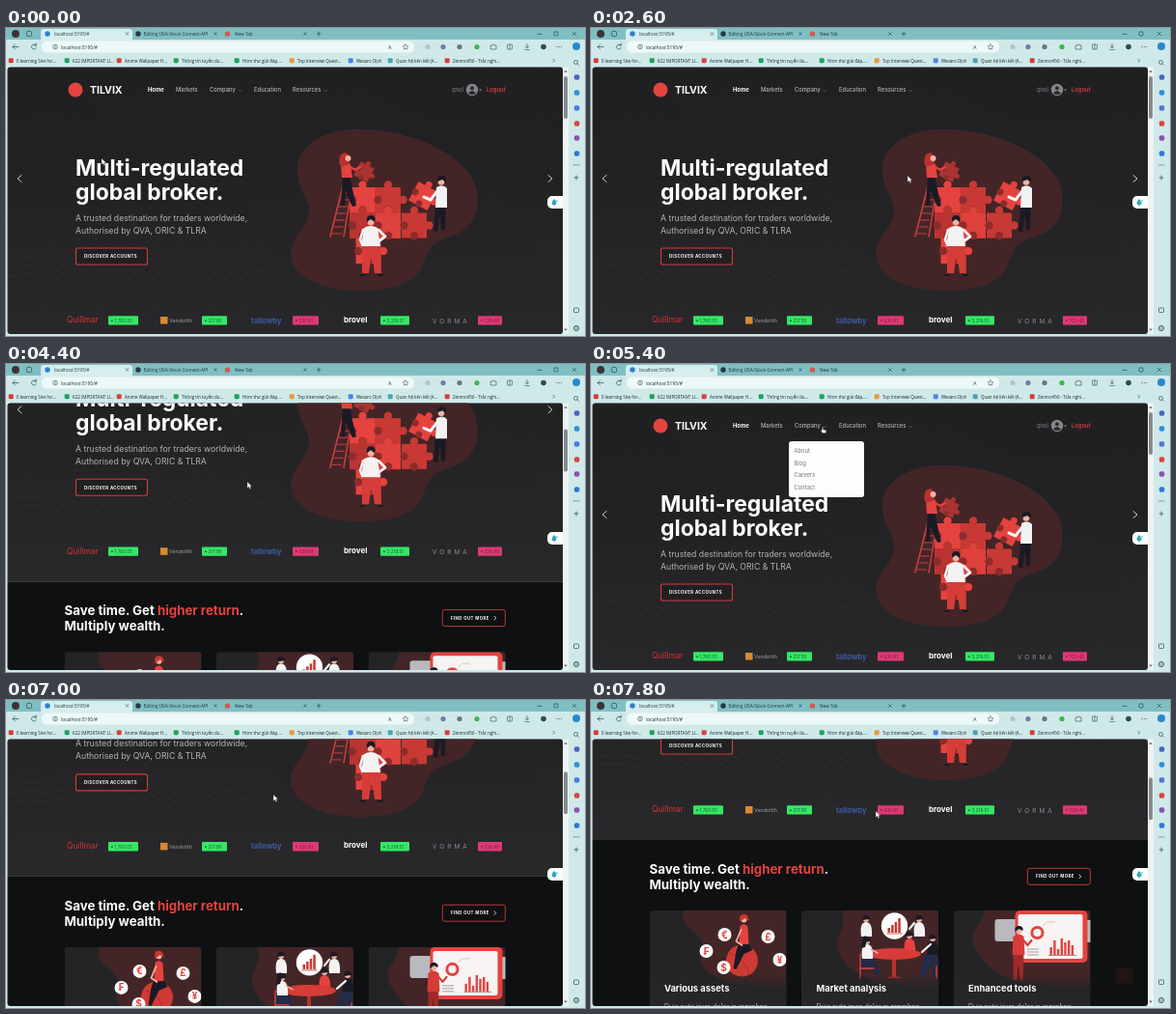
Write an HTML page that moves like this. It is 600 by 319 pixels and loops after 8 s.

```html
<!DOCTYPE html>
<html lang="en">
<head>
<meta charset="utf-8">
<title>Broker site in a browser</title>
<style>
  html, body { margin: 0; width: 100%; height: 100%; overflow: hidden; background: #cfe9e9; }
  svg { display: block; width: 100vw; height: 100vh; }
  text { font-family: Inter, "Noto Sans", sans-serif; white-space: pre; }
  .ui text { font-family: "Open Sans", "Noto Sans", sans-serif; }
</style>
</head>
<body>
<svg id="stage" viewBox="0 0 600 319"></svg>
<script>
const RED = '#e5433f', INK = '#1a1a24', SKIN = '#f3b3a4', BLOB = '#432527', WHITE = '#f4f2f3', NAVY = '#242a48';

// Shape helpers
const rect = (x, y, w, h, fill, rx = 0, more = '') =>
  `<rect x="${x}" y="${y}" width="${w}" height="${h}" rx="${rx}" fill="${fill}" ${more}/>`;
const dot = (x, y, r, fill, more = '') => `<circle cx="${x}" cy="${y}" r="${r}" fill="${fill}" ${more}/>`;
const shape = (d, fill, more = '') => `<path d="${d}" fill="${fill}" ${more}/>`;
const line = (d, stroke, width = 1) =>
  `<path d="${d}" fill="none" stroke="${stroke}" stroke-width="${width}" stroke-linecap="round" stroke-linejoin="round"/>`;
const text = (x, y, size, str, fill, more = '') =>
  `<text x="${x}" y="${y}" font-size="${size}" fill="${fill}" ${more}>${str}</text>`;
const bold = 'font-weight="700"';
const group = (more, ...parts) => `<g ${more}>${parts.join('')}</g>`;
const range = n => [...Array(n).keys()];
const cross = (x, y, r, color) =>
  line(`M${x - r} ${y - r}l${2 * r} ${2 * r}m0 ${-2 * r}l${-2 * r} ${2 * r}`, color, .6);
const plus = (x, y, r, color) => line(`M${x - r} ${y}h${2 * r}M${x} ${y - r}v${2 * r}`, color, .7);

// Browser window around the page
function browser() {
  const ink = '#2c4a50';
  const bookmarks = [
    [5, '#d63b3b', 'E-learning Site for...'], [63, '#1fa35c', 'K22 IMPORTANT LI...'],
    [117, '#d8433c', 'Anime Wallpaper H...'], [176, '#1fa35c', 'Thông tin tuyển du...'],
    [239, '#1fa35c', 'Hòm thư giải đáp,...'], [296, '#e79a2e', 'Top Interview Quest...'],
    [357, '#4a83e8', 'Wexaro Dịch'], [398, '#45a6b8', 'Quan hệ liên kết (A...'],
    [457, '#d63b3b', 'Zenmo456 - Trắc nghi...']
  ];
  const tools = [[437, '#b4c4c6'], [453, '#6a7fa8'], [470, '#6b7780'], [488, '#3fb24f']];
  const side = [[51, '#4a64c8'], [67, '#2e8fd8'], [83, '#4d78d9'],
    [99, '#d7473d'], [114, '#8b4fb3'], [130, '#2b7bd4']];
  return group('class="ui"',
    rect(0, 0, 600, 319, '#cfe9e9'),
    rect(0, 0, 600, 12, '#7fbfc3'),
    rect(36, 1, 95, 13, '#d5eeee', 3),
    dot(10, 6, 4, '#3c3236'),
    rect(21.5, 3.5, 5, 5, 'none', 1, `stroke="${ink}" stroke-width=".7"`),
    dot(43, 6, 2.7, '#2f7fd0'), text(50, 8, 4.7, 'localhost:5195/#', '#213539'), cross(125.5, 6, 1.4, ink),
    dot(137, 6, 2.7, '#24383e'), text(142.5, 8, 4.7, 'Editing USA-Stock-Connect-API', '#213539'), cross(217, 6, 1.4, ink),
    dot(229.5, 6, 2.7, '#d6594f'), text(237, 8, 4.7, 'New Tab', '#213539'), cross(310, 6, 1.4, ink),
    plus(324, 6, 2, ink),
    line('M551 6.3h4', ink, .7), rect(568, 4, 4, 4, 'none', .6, `stroke="${ink}" stroke-width=".7"`), cross(589, 6, 1.9, ink),
    rect(37, 13.5, 386, 12, '#eef8f8', 5),
    line('M13 19.5h-6m2.5-2.5l-2.5 2.5 2.5 2.5M31 18a2.5 2.5 0 1 0 .2 2.6M31.3 16v2h-2', ink, .7),
    dot(51, 19.5, 2.3, 'none', `stroke="${ink}" stroke-width=".6"`), line('M51 19.3v1.3M51 18.2v.1', ink, .6),
    text(57, 21.7, 4.9, 'localhost:5195/#', '#1c2c30'),
    text(396, 21.7, 5.5, 'A', ink),
    line('M414 16.7l.9 1.9 2 .2-1.5 1.4.4 2-1.8-1-1.8 1 .4-2-1.5-1.4 2-.2z', ink, .5),
    tools.map(([x, c]) => dot(x, 19.5, 2.6, c)).join(''),
    rect(519.5, 17, 5, 5, 'none', .7, `stroke="${ink}" stroke-width=".6"`), line('M522 17v5', ink, .6),
    line('M502.5 18h2a1 1 0 0 1 2 0h1.5v4h-5.5zM540 16.5v4m-1.8-1.6l1.8 1.7 1.8-1.7M537.6 22.5h4.8', ink, .6),
    dot(557, 19.5, 2.8, ink),
    [571, 573.3, 575.6].map(x => dot(x, 19.5, .55, ink)).join(''),
    bookmarks.map(([x, c, label]) => rect(x - 2.3, 31.3, 5, 5, c, 1.2) + text(x + 6, 35.7, 4.5, label, '#16282c')).join(''),
    line('M567 32.3l1.6 1.6-1.6 1.6', ink, .7),
    dot(591, 19, 4, '#2b86d0'),
    side.map(([y, c]) => rect(588.8, y - 2.7, 5.5, 5.5, c, 2)).join(''),
    dot(590.5, 35.5, 2, 'none', `stroke="${ink}" stroke-width=".7"`), line('M592 37l1.7 1.7M588 142h6', ink, .5),
    plus(591, 155, 2, ink),
    rect(588.5, 290, 5, 4.5, 'none', .8, `stroke="${ink}" stroke-width=".7"`),
    dot(591, 311, 2.5, 'none', `stroke="${ink}" stroke-width="1"`), dot(591, 311, .7, ink));
}

// Jigsaw piece of side s, with knobs on its right and top edges
function piece(x, y, s, fill, turn = 0) {
  const k = s * .16;
  return group(`transform="translate(${x} ${y}) rotate(${turn})"`,
    rect(-s / 2, -s / 2, s, s, fill), dot(s / 2 + k * .6, 0, k, fill), dot(0, -s / 2 - k * .6, k, fill),
    dot(-s / 2 + k * .6, 0, k, '#8d2c2b'), dot(0, s / 2 - k * .6, k, '#8d2c2b'));
}

function heroArt() {
  const rungs = range(7).map(i => line(`M${348 - i * 1.6} ${171 + i * 7}h9`, '#c9413d', 1)).join('');
  return [
    shape('M302 150C300 122 328 106 362 105C420 104 478 132 487 165C494 196 478 212 455 218C428 226 440 250 417 262C402 270 385 272 368 272C335 272 302 262 296 240C292 218 312 210 314 191C314 175 303 168 302 150Z', BLOB),
    line('M349 164l-13 52M358 168l-8 48', '#c9413d', 1.5), rungs,
    rect(356, 165, 53, 53, '#b93431'),
    piece(369.5, 178, 26, RED), piece(396, 178, 26, '#c83935'),
    piece(369.5, 204.5, 26, '#ba3431'), piece(396, 204.5, 26, '#df413d'),
    piece(423, 204.5, 26, '#c83935'), piece(375.5, 231, 26, RED),
    piece(371, 149, 16, '#a93431', 28), piece(432, 174, 22, RED, 28),
    // climber
    shape('M349 153l7 0 3 14 4 17-4 1-7-16-1 15-4 0z', INK),
    shape('M347 141q6-5 10 0l2 14h-11z', RED), line('M355 143l7 4 5-3', RED, 2.2),
    shape('M347 131q6-4 8 1l1 9-8 3q-5-4-1-13z', '#b8332f'), dot(354.5, 135, 3, SKIN),
    // right-hand helper
    shape('M445 184h11l-1 25-4 0-1-16-3 18-4-1z', INK), shape('M446 165q7-4 11 1l0 20h-12z', WHITE),
    line('M447 169l-7 9-7-3', WHITE, 3), dot(451, 159.5, 3.3, SKIN), shape('M447 159q-1-7 6-6 4 1 3 7l-4-3z', INK),
    // front helper
    shape('M369 225h19l1 29h-7l-3-22-3 22h-7z', '#d63c38'), line('M371 256h-4M386 256h4', INK, 2.2),
    shape('M371 207q7-4 14 0l3 19h-20z', WHITE),
    line('M386 209l7 7-7 5', WHITE, 2.8), line('M370 209l-3 10 2 5', WHITE, 2.6),
    dot(378, 201, 3.4, SKIN), shape('M374 201q-1-8 5-7 5 1 3 7l-4-3z', INK)
  ].join('');
}

function ticker() {
  const badges = [[106, 31, 1, '1,760.05'], [203, 26, 1, '217.90'], [297, 27, 0, '330.81'], [388, 30, 1, '3,218.51'], [489, 25, 0, '729.40']];
  return [
    text(63, 305.3, 8.4, 'Quillmar', '#d8302f'),
    rect(160, 299, 7.5, 7.5, '#d98a32'), text(169, 305, 5.4, 'Vendolith', '#a0a0a4'),
    text(254, 305.5, 7.6, 'tallowby', '#3d5a9f', bold),
    text(350, 304.5, 8, 'brovel', '#fff', bold),
    text(442, 305.5, 6.5, 'VORMA', '#8b8b90', 'letter-spacing="3"'),
    badges.map(([x, w, up, value]) =>
      rect(x, 298.2, w, 9.4, up ? '#35e765' : '#dd3a73', 1) +
      shape(up ? `M${x + 2.6} 303.8l1.3-2 1.3 2z` : `M${x + 2.6} 302l1.3 2 1.3-2z`, up ? '#14612f' : '#8b1843') +
      text(x + 6.5, 304.7, 4.7, value, up ? '#14612f' : '#8b1843')).join('')
  ].join('');
}

function waves() {
  const left = range(26).map(i => `M0 ${52 + i * 9}C70 ${30 + i * 9} 90 ${120 + i * 8} ${290 - i * 3} ${205 + i * 7}`).join('');
  const right = range(20).map(i => `M${350 + i * 11} 40C${410 + i * 10} 100 ${480 + i * 6} 70 577 ${280 - i * 11}`).join('');
  return group('opacity=".26"', line(left, 'url(#wave)', .9)) + group('opacity=".22"', line(right, 'url(#wave)', .9));
}

function hero() {
  const nav = [[176, 'Markets'], [211, 'Company'], [257, 'Education'], [297, 'Resources']];
  return [
    rect(0, 38, 578, 296, 'url(#heroShade)'), waves(),
    dot(72, 64, 7.5, RED), text(87, 67.6, 10.5, 'TILVIX', '#fff', bold),
    text(147, 66.3, 5.8, 'Home', '#fff', bold),
    nav.map(([x, label]) => text(x, 66.3, 5.85, label, '#b4b4b8', 'font-weight="500"')).join(''),
    line('M241 64.3l1.4 1.4 1.4-1.4M330 64.3l1.4 1.4 1.4-1.4', '#77777c', .6),
    text(462, 66.3, 5.9, 'qnol', '#85858a'), dot(483, 64, 6.2, '#85858a'),
    dot(483, 62.2, 2, '#2a2a2d'), shape('M479 67.5q4-5 8 0q-4 3-8 0z', '#2a2a2d'), shape('M490 63.4h3.2l-1.6 1.8z', '#85858a'),
    text(498, 66.3, 5.85, 'Logout', RED, 'font-weight="500"'),
    text(72, 153, 22.9, 'Multi-regulated', '#fff', bold), text(72, 178, 22.9, 'global broker.', '#fff', bold),
    text(72, 199.5, 8.7, 'A trusted destination for traders worldwide,', '#b3b3b7'),
    text(72, 212.5, 8.7, 'Authorised by QVA, ORIC &amp; TLRA', '#b3b3b7'),
    rect(72.5, 228, 74, 17, '#202022', 2, 'stroke="#cf3d3b" stroke-width="1.1"'),
    text(81, 238.4, 4.3, 'DISCOVER ACCOUNTS', '#fff', bold + ' letter-spacing=".42"'),
    line('M16 152.5l-4 3.5 4 3.5M562 152.5l4 3.5-4 3.5', '#e3e3e5', .9),
    heroArt(), ticker()
  ].join('');
}

// Card pictures use the card's own corner as origin
function assetsArt() {
  const coins = [[78, 25, '€'], [123, 27, '£'], [59, 42, '₣'], [77, 59, '$'], [135, 51, '¥']];
  return shape('M37 0C25 18 62 22 55 42C46 58 62 78 142 82V0Z', BLOB) +
    dot(96, 52, 16.5, '#cf3a35') + line('M84 45q14 2 20 22', '#a02b2a', 1) +
    shape('M93 33h9l5 8-9 4-8 16-3-1 3-18z', INK) + shape('M94 16q5-4 8 1l1 18h-10z', RED) +
    line('M95 20l-5 12 6 4', SKIN, 1.8) + dot(98, 9.5, 2.9, SKIN) + shape('M94 12q-2-9 5-8 4 1 4 7l-4-3z', '#c93733') +
    coins.map(([x, y, sign]) => dot(x, y, 7, '#fff') + text(x, y + 3.6, 10, sign, RED, bold + ' text-anchor="middle"')).join('');
}

function analysisArt() {
  const sitter = (x, y, shirt) => shape(`M${x - 5} ${y + 18}q-2-15 5-15t6 15z`, shirt) +
    dot(x, y, 3, SKIN) + shape(`M${x - 4} ${y + 1}q0-6 5-5 4 1 3 4z`, INK);
  return shape('M42 0C50 18 30 28 40 46C54 74 100 82 142 80V0Z', BLOB) +
    rect(94, 46, 4, 24, '#b8332f') + shape('M88 70q8-4 16 0z', '#b8332f') +
    sitter(67, 9, WHITE) + sitter(112, 26, RED) + sitter(122, 9, WHITE) + sitter(136, 29, INK) +
    line('M117 13l-5 6M134 35l-9 8', WHITE, 2.2) +
    shape('M68 45a28 6 0 0 0 56 0a28 6 0 0 0-56 0z', '#d63c38') +
    shape('M61 49h14l7 18-3 2-8-11-9 3z', NAVY) + shape('M128 46h13v24h-4l-2-14-9 14-4-1z', NAVY) +
    sitter(68, 32, WHITE) + shape('M63 32q-1-7 6-5l-3 11-4 1z', INK) + line('M72 40l7 4', SKIN, 1.6) +
    line('M61 45v25M75 60h-14M140 58v12', RED, 1.3) +
    dot(96.5, 16, 13.7, '#fff') + [5, 8, 11, 15].map((h, i) => rect(89.5 + i * 3.6, 23 - h, 2.5, h, '#c93733')).join('') +
    line('M89 24h15', '#c93733', .8);
}

function toolsArt() {
  const bars = [8, 15, 6, 17, 13, 15, 10];
  return shape('M32 0C32 14 12 23 24 41C42 76 88 82 142 80V0Z', BLOB) +
    rect(43, 9, 26, 23, '#b9b9be', 3) + rect(134, 10, 10, 23, '#b9b9be', 2) +
    rect(64, 0, 75, 54, RED, 5) + rect(67, 4, 67, 46, '#f7f3f3', 2) +
    dot(87, 23, 5.6, 'none', `stroke="${RED}" stroke-width="3"`) + line('M93 16l4-4h8', '#d0a0a0', .6) +
    bars.map((h, i) => rect(100 + i * 3.7, 46 - h, 2.4, h, RED)).join('') + line('M99 46.5h28', '#8a3030', .6) +
    range(3).map(i => line(`M77 ${40 + i * 3}h11`, '#77777c', .7)).join('') +
    shape('M62 44h11l-1 28h-3l-2-19-1 19h-4z', '#a02b2a') + shape('M62 27q6-5 11 0l1 19H61z', '#d63c38') +
    line('M72 30l5 6 4-5', '#d63c38', 2.2) + dot(68, 21, 3, SKIN) + shape('M64 22q-1-7 5-6 4 1 3 5l-4-2z', INK);
}

function card(x, title, art) {
  const copy = ['Duis aute irure dolor in reprehen', 'derit in voluptate velit esse cillum', 'dolore eu fugiat nulla pariatur.'];
  return group(`transform="translate(${x} 407)" clip-path="url(#cardClip)"`,
    rect(0, 0, 142, 141, '#242427', 3), art, rect(0, 66, 142, 75, 'url(#cardFade)'),
    text(15.5, 83.9, 9.375, title, '#fff', bold),
    copy.map((row, i) => text(15.5, 101.9 + i * 10.4, 7.03, row, '#b6b6ba')).join(''));
}

function benefits() {
  return [
    rect(0, 334, 578, 244, '#0e1011'), rect(0, 578, 578, 120, '#f6eff0'),
    text(60.5, 369.2, 13.28, `Save time. Get <tspan fill="${RED}">higher return</tspan>.`, '#fff', bold),
    text(60.5, 385, 13.28, 'Multiply wealth.', '#fff', bold),
    rect(452.3, 363.3, 65, 17, '#0e1011', 2, 'stroke="#bd3a39" stroke-width="1"'),
    text(461, 373.4, 4.3, 'FIND OUT MORE', '#fff', bold + ' letter-spacing=".42"'), line('M506 370l1.8 1.8-1.8 1.8', '#fff', .8),
    card(60.5, 'Various assets', assetsArt()),
    card(218, 'Market analysis', analysisArt()),
    card(375.5, 'Enhanced tools', toolsArt())
  ].join('');
}

const menu = rect(205, 80, 78, 58, '#fdfdfd', 3) + ['About', 'Blog', 'Careers', 'Contact']
  .map((label, i) => text(210.5, 92.2 + i * 12.6, 5.85, label, '#77777d')).join('');

const gradient = (id, box, ...stops) => `<linearGradient id="${id}" ${box}>${stops.map(([at, color, alpha = 1]) =>
  `<stop offset="${at}" stop-color="${color}" stop-opacity="${alpha}"/>`).join('')}</linearGradient>`;

document.getElementById('stage').innerHTML = `<defs>
  ${gradient('heroShade', 'x2="0" y2="1"', [0, '#202022'], [.5, '#232325'], [1, '#29292c'])}
  ${gradient('cardFade', 'x2="0" y2="1"', [0, '#262629', 0], [.2, '#262629'], [1, '#29292c'])}
  ${gradient('wave', 'gradientUnits="userSpaceOnUse" x1="0" y1="60" x2="0" y2="288"', [0, '#0c0c0e'], [.5, '#141213'], [.85, '#6a3436'], [1, '#6a3436', 0])}
  <clipPath id="pageClip">${rect(1.5, 40.5, 575.5, 276.5, '#000', 3)}</clipPath>
  <clipPath id="cardClip">${rect(0, 0, 142, 141, '#000', 3)}</clipPath>
</defs>` + browser() + group('clip-path="url(#pageClip)"',
    group('id="page"', hero(), benefits(), group('id="menu"', menu)),
    group('id="toTop"', rect(543.5, 277.5, 18, 17, '#a03333', 3), line('M550 287.2l2.5-2.4 2.5 2.4', '#e8b9b9', .8)),
    rect(561, 174, 20, 13, '#fafcfc', 5), shape('M568 177q5 5 0 7q-5-2 0-7z', '#2ea6bd'), dot(571, 179, .8, '#2ea6bd')) +
  rect(577, 40.5, 6, 276.5, '#eef3f3') + shape('M580 43.5l1.7 2.5h-3.4zM580 314l1.7-2.5h-3.4z', '#68787a') +
  group('id="thumb"', rect(578, 50, 4, 44, '#868c8d', 2)) +
  group('id="arrow"', shape('M0 0v6.6l1.6-1.4 1.2 2.4 1.2-.6-1.1-2.3h2.1z', '#fff', 'stroke="#333" stroke-width=".4"')) +
  group('id="hand"', shape('M1.4 3.6V.6q.6-.9 1.2 0v2.2l2.6.7q.6.2.5.9l-.4 2.2H2L.2 4.3q.3-.8 1.2-.7z', '#fff', 'stroke="#333" stroke-width=".4"'));

// Motion: [time, value...] keys, eased between neighbours
const scrollKeys = [[0, 0], [2900, 0], [3800, 156], [4100, 195], [4750, 0], [6650, 0], [7300, 271], [7500, 271], [7800, 189], [8000, 150]];
const cursorKeys = [[0, 99, 135], [200, 99, 135], [2200, 328, 153], [2800, 328, 153], [3700, 250, 122], [4700, 250, 122],
  [5250, 238, 65], [5800, 238, 65], [6500, 260, 87], [6700, 260, 87], [7300, 294, 109], [7800, 295, 115], [8000, 295, 116]];

function sample(keys, t) {
  const i = keys.findIndex(key => key[0] > t), [a, b] = [keys[i - 1], keys[i]];
  const p = (t - a[0]) / (b[0] - a[0]), eased = p * p * (3 - 2 * p);
  return a.slice(1).map((v, k) => v + (b[k + 1] - v) * eased);
}

const part = id => document.getElementById(id);
const move = (id, x, y) => part(id).setAttribute('transform', `translate(${x} ${y})`);
const show = (id, alpha) => part(id).setAttribute('opacity', alpha);
const within = (t, from, to) => t >= from && t < to ? 1 : 0;

function draw(now) {
  const t = Math.floor(now % 8000 / 200) * 200;
  const [scroll] = sample(scrollKeys, t), [x, y] = sample(cursorKeys, t);
  const pointing = within(t, 5200, 6000);
  move('page', 0, -scroll);
  move('thumb', 0, scroll * .16);
  move('arrow', x, y);
  move('hand', x, y);
  show('menu', pointing);
  show('hand', pointing);
  show('arrow', 1 - pointing);
  show('toTop', Math.min(1, Math.max(0, (scroll - 179) / 80)));
  requestAnimationFrame(draw);
}
draw(0);
</script>
</body>
</html>
```
